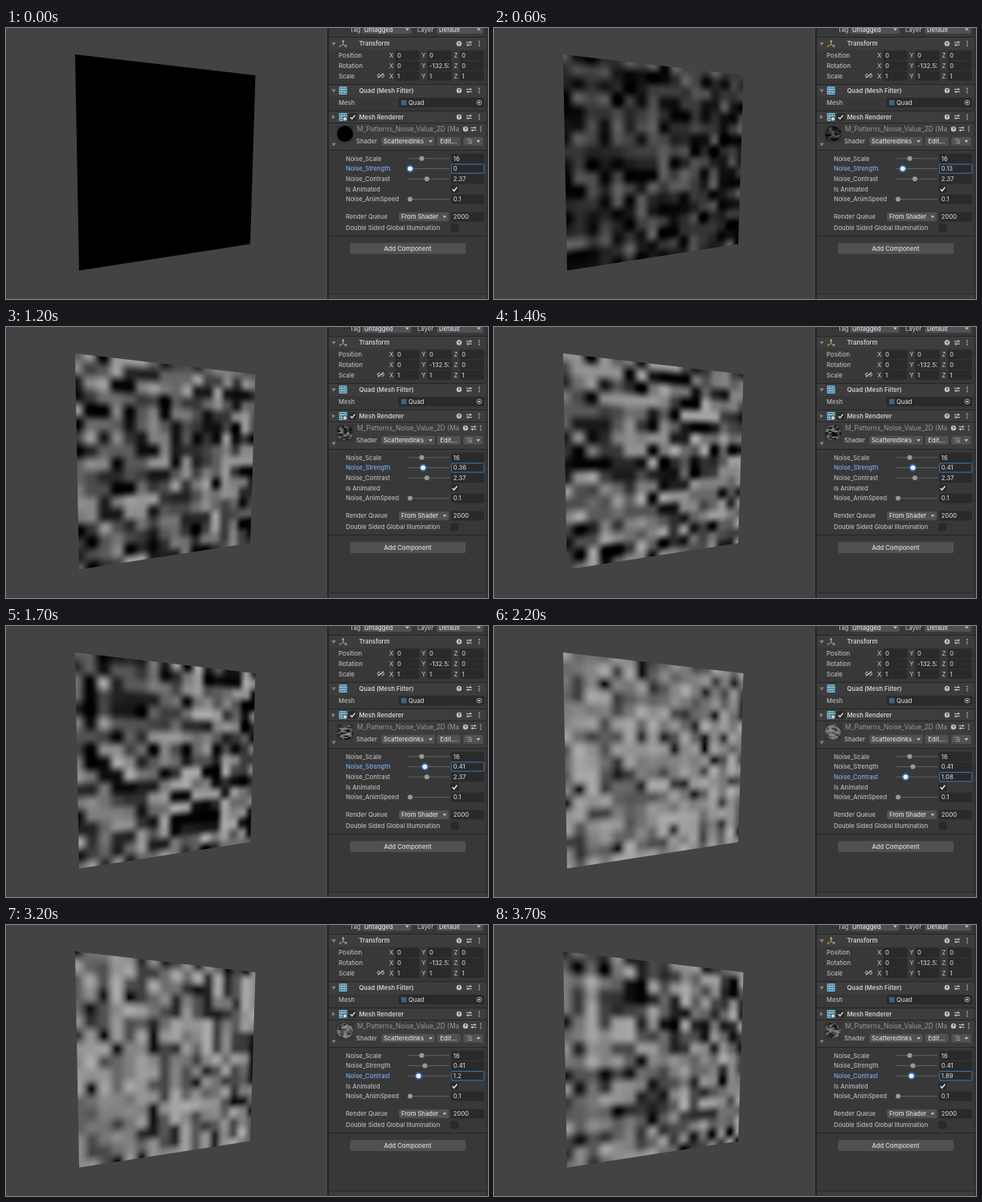
Animation, 600 px wide and 338 px high, one loop 3800 ms. Source, as an HTML page with a canvas:

```html
<!DOCTYPE html>
<html lang="en">
<head>
<meta charset="utf-8">
<title>Value noise inspector</title>
<style>
html, body { margin: 0; width: 100%; height: 100%; overflow: hidden; background: #434343; }
svg.ui, canvas { position: absolute; left: 0; top: 0; width: 600px; height: 338px; }
text { font: 500 7.6px Inter, Roboto, sans-serif; fill: #b8b8ba; white-space: pre; }
.head { font-weight: 600; fill: #cfcfd0; }
.val { fill: #cacacc; }
.btn { fill: #dcdcde; }
.title { font-size: 8.25px; font-weight: 400; fill: #979799; }
.field { fill: #2a2a2b; stroke: #242425; stroke-width: .4; }
.drop { fill: #515153; stroke: #343435; stroke-width: .5; }
.icon { fill: none; stroke: #c4c4c4; stroke-width: 1; }
.solid { fill: #c4c4c4; }
.fold { fill: #808080; }
.knob { fill: #999; }
.halo { fill: #2f74c8; opacity: 0; }
.on text.label { fill: #7aaae8; }
.on .knob { fill: #e6f0ff; }
.on .halo { opacity: .65; }
.on .field { stroke: #3a72b0; stroke-width: 1; }
</style>
</head>
<body>
<svg class="ui" viewBox="0 0 600 338"></svg>
<canvas width="600" height="338"></canvas>
<script>
const LOOP = 3800, STEP = 100, CELLS = 16, W = 600, H = 338;
const ui = document.querySelector('svg.ui');

// ---- inspector panel ----
const rect = (x, y, w, h, fill) => `<rect x="${x}" y="${y}" width="${w}" height="${h}" fill="${fill}"/>`;
const box = (x, y, w, h, cls) => `<rect class="${cls}" x="${x}" y="${y}" width="${w}" height="${h}" rx="1.6"/>`;
const text = (x, y, s, cls = '') => `<text x="${x}" y="${y + 2.8}" class="${cls}">${s}</text>`;
const path = (d, cls = 'icon', extra = '') => `<path d="${d}" class="${cls}" ${extra}/>`;
const caret = (x, y) => path(`M${x - 2.4} ${y - 1.2}h4.8l-2.4 2.8z`, 'solid');
const foldout = (x, y) => path(`M${x - 2.8} ${y - 1.6}h5.6l-2.8 4z`, 'fold');
const foldRight = (x, y) => path(`M${x - 1.6} ${y - 2.8}v5.6l4 -2.8z`, 'fold');
const clipped = (x, y, w, s, cls) =>
  `<svg x="${x}" y="${y - 6}" width="${w}" height="12">${text(0, 6, s, cls)}</svg>`;
const field = (x, y, w, s) => box(x, y - 5.6, w, 11.2, 'field') + clipped(x + 2.3, y, w - 4.8, s, 'val');
const dropdown = (x, y, w, s) =>
  box(x, y - 5.8, w, 11.6, 'drop') + clipped(x + 3, y, w - 11, s, 'btn') + caret(x + w - 5.5, y);
const check = (x, y, ticked) => box(x - 4.6, y - 4.6, 9.2, 9.2, 'field') +
  (ticked ? path(`M${x - 2.8} ${y + .2}l2 2.2 3.8 -4.8`, 'icon', 'style="stroke:#ddd;stroke-width:1.5"') : '');
const axis = (angle, colour) => `<g transform="rotate(${angle} 419.6 20.6)">` +
  path('M419.6 20.6v-3.4', 'icon', `style="stroke:${colour}"`) +
  path('M417.9 17.4l1.7 -2.8 1.7 2.8z', '', `fill="${colour}"`) + '</g>';

const tools = (y, a = 564, b = 576.5, c = 589) => `
  <circle class="solid" cx="${a}" cy="${y}" r="3.2"/>
  <text x="${a}" y="${y + 2}" text-anchor="middle" style="font-size:5.4px;font-weight:700;fill:#333">?</text>` +
  path(`M${b - 3.5} ${y - 1.6}h7M${b - 3.5} ${y + 1.6}h7M${b + 1.4} ${y - 3.2}v3.2M${b - 1.4} ${y}v3.2`) +
  [-2.6, 0, 2.6].map(d => `<circle class="solid" cx="${c}" cy="${y + d}" r=".8"/>`).join('');

const gridIcon = (x, y) => rect(x - 4.5, y - 4.5, 9, 9, '#3a7f9f') +
  path(`M${x - 4.5} ${y - 1.5}h9m-9 3h9M${x - 1.5} ${y - 4.5}v9m3 -9v9M${x - 4.5} ${y - 4.5}h9v9h-9z`,
    'icon', 'style="stroke:#9ccfe0;stroke-width:.8"');

const vector = (y, label, vals) => text(414, y, label) + vals.map((v, i) =>
  text(477 + i * 40.2, y, 'XYZ'[i]) + field(484.6 + i * 40.2, y, 29.5, v)).join('');

const slider = (y, label, x, val, id = '') => `<g id="${id}">` + text(423, y, label, 'label') +
  rect(500, y - .5, 52, 1, '#626263') +
  `<g class="thumb" transform="translate(${x} ${y})"><circle class="halo" r="4.9"/><circle class="knob" r="3"/></g>` +
  box(554.5, y - 5.6, 40.5, 11.2, 'field') + text(556.8, y, val, 'val num') + '</g>';

const rule = y => rect(402, y, 196, 1, '#252526');
const header = (y, h) => rule(y) + rect(402, y + 1, 196, h, '#3d3d3e');

ui.innerHTML =
  rect(0, 0, W, H, '#434343') + rect(401, 0, 199, H, '#383839') + rect(400, 0, 1.6, H, '#222') +
  // object line
  text(428, 1.8, 'Tag') + dropdown(443, 1.8, 62, 'Untagged') +
  text(512, 1.8, 'Layer') + dropdown(536, 1.8, 58, 'Default') +
  // transform
  header(11, 15) + foldout(408, 19.5) +
  axis(0, '#a5c96a') + axis(-120, '#d9683f') + axis(120, '#7fb3cc') +
  text(439.5, 19.5, 'Transform', 'head') + tools(19.5) +
  vector(34.4, 'Position', [0, 0, 0]) +
  vector(47.1, 'Rotation', [0, '-132.53', 0]) +
  vector(59.8, 'Scale', [1, 1, 1]) +
  path('M465.5 57.4h-1a2 2 0 0 0 0 4h1M467.5 57.4h1a2 2 0 0 1 0 4h-1M464.5 59.4h4M463 62.5l7 -6') +
  // mesh filter
  header(70, 15) + foldout(408, 78) + gridIcon(419.5, 78) +
  text(439.5, 78, 'Quad (Mesh Filter)', 'head') + tools(78) +
  text(414, 93, 'Mesh') + box(489, 87.4, 106, 11.2, 'field') +
  rect(492, 89.8, 6.6, 6.6, '#3f6478') +
  text(501, 93, 'Quad', 'val') +
  '<circle class="icon" cx="589" cy="93" r="2.9" style="stroke-width:.8"/><circle class="solid" cx="589" cy="93" r="1.2"/>' +
  // mesh renderer
  header(103, 15) + foldRight(407.5, 111) + gridIcon(419.5, 111) +
  '<circle cx="422" cy="113.4" r="2.8" fill="#c5d3d8" stroke="#333" stroke-width=".9"/>' +
  check(431.5, 111, true) + text(439.5, 111, 'Mesh Renderer', 'head') + tools(111) +
  // material
  rule(118) + rect(402, 119, 196, 33, '#3c3c3d') + rule(152) +
  rect(411.5, 121.5, 21, 21, '#343434') +
  text(437, 126, 'M_Patterns_Noise_Value_2D (Ma', 'title') + tools(126, 572, 582, 591) +
  foldout(408, 145) + text(436, 141.3, 'Shader') +
  dropdown(467, 141.3, 67, 'ScatteredInks') +
  box(536.5, 135.5, 29.5, 11.6, 'drop') + text(540.5, 141.3, 'Edit...', 'btn') +
  box(569, 135.5, 25, 11.6, 'drop') +
  path('M573 139h1.2m1 0h4M574.6 141.3h1.2m1 0h3.4M574.6 143.6h1.2m1 0h3.4', 'icon', 'style="stroke-width:.8"') +
  caret(588, 141.3) +
  // properties
  slider(162.8, 'Noise_Scale', 517.5, '16') +
  slider(175.5, 'Noise_Strength', 503, '0', 'strength') +
  slider(188.2, 'Noise_Contrast', 523.8, '2.37', 'contrast') +
  text(423, 200.9, 'Is Animated') + check(558.5, 200.9, true) +
  slider(213.6, 'Noise_AnimSpeed', 503, '0.1') +
  text(423, 235.5, 'Render Queue') + dropdown(489, 235.5, 62.5, 'From Shader') + field(554.5, 235.5, 40.5, '2000') +
  text(423, 249.4, 'Double Sided Global Illumination') + check(558.5, 249.4, false) +
  rule(259) + box(428, 267.8, 144.5, 14.4, 'drop') +
  '<text class="btn" x="500" y="277.8" text-anchor="middle">Add Component</text>' +
  rule(331.5) + rect(402, 332.5, 196, 6, '#3c3c3d') + rect(598, 0, 1, H, '#272728');

// ---- noise surface ----
const QUAD = [[86, 33], [310.5, 59], [304, 269.5], [91, 302.5]];
const BALL = { x: 422, y: 132, r: 10 };
const ctx = document.querySelector('canvas').getContext('2d');
const buffer = document.createElement('canvas');
buffer.width = W; buffer.height = H;
const bctx = buffer.getContext('2d');
const image = bctx.createImageData(W, H);
const samples = [];
const clamp = v => Math.min(Math.max(v, 0), .9999);
const add = (x, y, u, v, light) => samples.push({ i: (y * W + x) * 4, u: clamp(u) * CELLS, v: clamp(v) * CELLS, light });

// screen point to texture coordinate through the quad's perspective
function unproject([[x0, y0], [x1, y1], [x2, y2], [x3, y3]]) {
  const dx1 = x1 - x2, dx2 = x3 - x2, sx = x0 - x1 + x2 - x3;
  const dy1 = y1 - y2, dy2 = y3 - y2, sy = y0 - y1 + y2 - y3;
  const det = dx1 * dy2 - dx2 * dy1;
  const g = (sx * dy2 - sy * dx2) / det, h = (dx1 * sy - dy1 * sx) / det;
  const a = x1 - x0 + g * x1, b = x3 - x0 + h * x3;
  const d = y1 - y0 + g * y1, e = y3 - y0 + h * y3;
  return (x, y) => {
    const p = a - g * x, q = b - h * x, r = d - g * y, s = e - h * y, k = p * s - q * r;
    return [((x - x0) * s - q * (y - y0)) / k, (p * (y - y0) - r * (x - x0)) / k];
  };
}

const toUV = unproject(QUAD);
for (let y = 30; y < 306; y++) for (let x = 83; x < 314; x++) {
  const [u, v] = toUV(x + .5, y + .5);
  if (Math.abs(u - .5) < .52 && Math.abs(v - .5) < .52) add(x, y, u, v, 1);
}
for (let y = -11; y < 11; y++) for (let x = -11; x < 11; x++) {
  let nx = (x + .5) / BALL.r, ny = (y + .5) / BALL.r;
  const len = Math.max(1, Math.hypot(nx, ny));
  nx /= len; ny /= len;
  const nz = Math.sqrt(Math.max(0, 1 - nx * nx - ny * ny));
  add(BALL.x + x, BALL.y + y, .5 + Math.atan2(nx, nz) / (2 * Math.PI), .5 + Math.asin(ny) / Math.PI, .35 + .5 * nz);
}

function random(seed) {
  let s = seed * 7919 + 101;
  return () => {
    s = s + 0x6D2B79F5 | 0;
    let t = Math.imul(s ^ s >>> 15, 1 | s);
    t = t + Math.imul(t ^ t >>> 7, 61 | t) ^ t;
    return ((t ^ t >>> 14) >>> 0) / 4294967296;
  };
}

// random lattice; a few cells run together along an axis that drifts with time
function lattice(step) {
  const rnd = random(step + 1), n = CELLS + 1, out = [];
  const streak = Math.cos((step - 32) * Math.PI / 18) ** 3;
  for (let i = 0; i < n * n; i++) {
    const v = rnd(), join = rnd() < Math.abs(streak) * .18;
    const prev = streak > 0 ? i - n : i % n ? i - 1 : -1;
    out.push(join && prev >= 0 ? out[prev] : v);
  }
  return out;
}

const ease = f => f * f * (3 - 2 * f);
const mix = (a, b, f) => a + (b - a) * f;
const srgb = l => 255 * (l < .0031308 ? 12.92 * l : 1.055 * l ** (1 / 2.4) - .055);

function paint(step, strength, contrast) {
  const grid = lattice(step), n = CELLS + 1, px = image.data;
  for (const { i, u, v, light } of samples) {
    const x = u | 0, y = v | 0, k = y * n + x, fx = ease(u - x), fy = ease(v - y);
    const value = mix(mix(grid[k], grid[k + 1], fx), mix(grid[k + n], grid[k + n + 1], fx), fy);
    px[i] = px[i + 1] = px[i + 2] = srgb(value ** contrast * strength * light);
    px[i + 3] = 255;
  }
  bctx.putImageData(image, 0, 0);
  ctx.clearRect(0, 0, W, H);
  ctx.save();
  ctx.beginPath();
  QUAD.forEach(p => ctx.lineTo(...p));
  ctx.closePath();
  ctx.moveTo(BALL.x + BALL.r, BALL.y);
  ctx.arc(BALL.x, BALL.y, BALL.r, 0, 7);
  ctx.clip();
  ctx.drawImage(buffer, 0, 0);
  ctx.restore();
}

// ---- timeline ----
const STRENGTH = [[0, 0], [200, .02], [900, .21], [1300, .41]];
const CONTRAST = [[1800, 2.37], [2200, 1.08], [2600, 1], [3200, 1.2], [3700, 1.89]];
function at(keys, t) {
  if (t <= keys[0][0]) return keys[0][1];
  const j = keys.findIndex(k => k[0] >= t);
  if (j < 0) return keys[keys.length - 1][1];
  const [t0, a] = keys[j - 1], [t1, b] = keys[j];
  return mix(a, b, (t - t0) / (t1 - t0));
}

function control(id, value, x, y, active) {
  const g = document.getElementById(id);
  g.setAttribute('class', active ? 'on' : '');
  g.querySelector('.thumb').setAttribute('transform', `translate(${x} ${y})`);
  g.querySelector('.num').textContent = +value.toFixed(2);
}

let shown = -1, start;
function show(time) {
  const step = Math.floor(time % LOOP / STEP);
  if (step === shown) return;
  shown = step;
  const t = step * STEP, s = at(STRENGTH, t), c = at(CONTRAST, t);
  control('strength', s, 503 + 45 * s, 175.5, t < 1800);
  control('contrast', c, 502.8 + 8.9 * c, 188.2, t >= 1800);
  paint(step, s, c);
}
function tick(now) {
  start ??= now;
  show(now - start);
  requestAnimationFrame(tick);
}
show(0);
requestAnimationFrame(tick);
</script>
</body>
</html>
```
